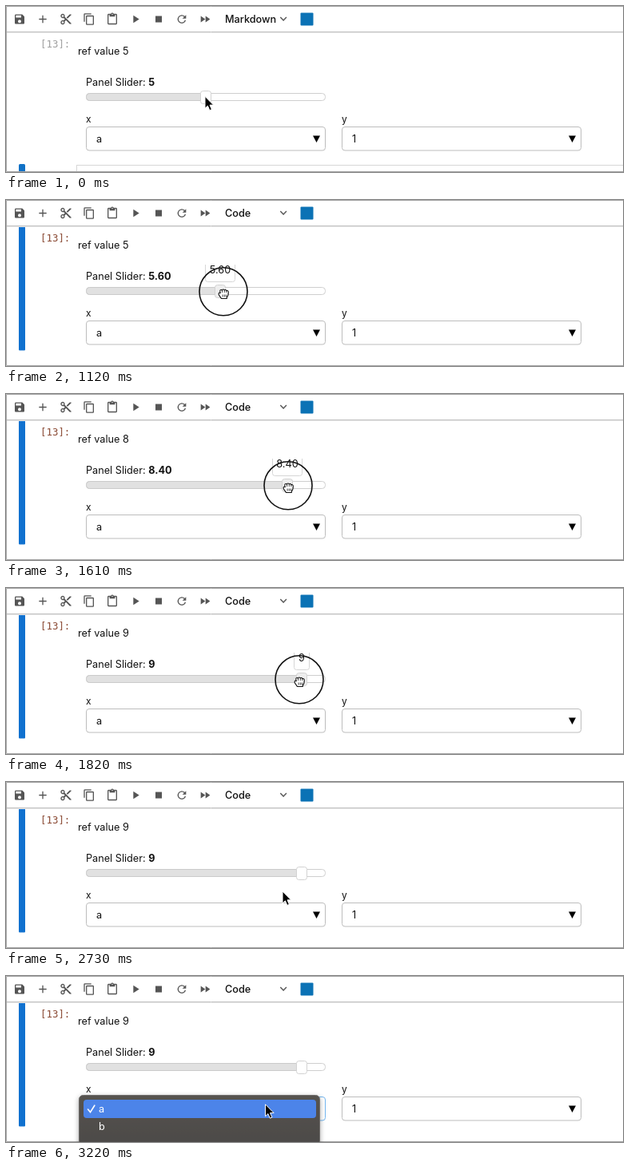
Recreate the animation shown at these times as an HTML page. Size 772x208 px, loop 3290 ms.

```html
<!DOCTYPE html>
<html lang="en">
<head>
<meta charset="utf-8">
<title>Notebook slider</title>
<style>
  html, body { margin: 0; width: 100%; height: 100%; overflow: hidden; background: #fff; }
  svg { display: block; width: 772px; height: 208px; }
  text { font: 12.7px Inter, "Open Sans", sans-serif; fill: #111; white-space: pre; }
  .bold { font-weight: 700; }
  .small { font-size: 12px; }
  .mono { font: 12.4px "DejaVu Sans Mono", monospace; }
  .mid { text-anchor: middle; }
  .field { fill: #fff; stroke: #bdbdbd; }
  .menu text { fill: #fff; }
</style>
</head>
<body>
<svg viewBox="0 0 772 208">
  <defs>
    <clipPath id="output"><rect x="88" y="81" width="684" height="127"/></clipPath>
    <linearGradient id="menuFill" x2="0" y2="1">
      <stop stop-color="#565350"/><stop offset="1" stop-color="#484644"/>
    </linearGradient>
    <filter id="shadow" x="-10%" y="-30%" width="120%" height="160%">
      <feDropShadow dx="0" dy="2" stdDeviation="3" flood-opacity=".35"/>
    </filter>
  </defs>
  <rect width="772" height="208" fill="#fff"/>

  <g id="nextCell">
    <rect x="88.5" y="199.5" width="700" height="30" fill="#fff" stroke="#d6d6d6"/>
    <rect x="16" y="198" width="8" height="20" rx="1.5" fill="#1071c6"/>
  </g>
  <rect id="cellBar" x="16" y="33" width="8" height="155.5" rx="1" fill="#1071cf"/>

  <text id="prompt" class="mono" x="43" y="52">[13]:</text>
  <text id="ref" x="90" y="61"></text>
  <text x="100" y="99.5">Panel Slider: <tspan id="value" class="bold"></tspan></text>

  <rect class="field" x="100.5" y="109.5" width="299" height="9" rx="4" style="stroke:#cfcfcf"/>
  <path id="filled" fill="#e1e1e1" stroke="#cbcbcb"/>
  <rect id="handle" y="106.5" width="13" height="16" rx="3" stroke="#d2d2d2"/>
  <g id="tip" clip-path="url(#output)">
    <rect id="tipBox" y="74.5" height="28" rx="3" fill="#fff" stroke="#d6d6d6"/>
    <text id="tipText" class="mid" y="92.3"></text>
  </g>

  <text class="small" x="100" y="146">x</text>
  <text class="small" x="420" y="146">y</text>
  <rect id="selectX" class="field" x="100.5" y="151.5" width="299" height="29.5" rx="3.5"/>
  <rect class="field" x="420.5" y="151.5" width="299" height="29.5" rx="3.5"/>
  <text x="113" y="171">a</text>
  <text x="433" y="171">1</text>
  <path d="M384 162.5h9l-4.5 8.5zM704 162.5h9l-4.5 8.5z" fill="#000"/>

  <path d="M0 32.5H772" stroke="#bdbdbd"/>
  <path d="M0 33.5H772" stroke="#ececec"/>
  <g id="icons" fill="#555"></g>
  <text id="mode" x="274" y="21" style="font-weight:500"></text>
  <path d="M343.3 14l3.8 4 3.8-4" fill="none" stroke="#555" stroke-width="1.4"/>
  <rect x="368.5" y="8.5" width="16" height="16" rx="1" fill="#0b72b5"/>
  <path d="M772 .5H.5V207.5H772" fill="none" stroke="#a5a5a5"/>

  <g id="menu" class="menu">
    <rect x="91.5" y="149.5" width="301" height="90" rx="5" fill="url(#menuFill)" stroke="#6e6c6a" filter="url(#shadow)"/>
    <rect x="97" y="155" width="291" height="23" rx="4" fill="#4c84e9"/>
    <path d="M102.5 167l3 3.6 5.3-8.4" fill="none" stroke="#fff" stroke-width="1.6" stroke-linecap="round"/>
    <text x="116" y="171">a</text>
    <text x="116" y="193">b</text>
    <text x="116" y="215">c</text>
  </g>

  <circle id="ring" fill="none" stroke="#111" stroke-width="1.6"/>
  <g id="arrow">
    <path d="M0 0V15L3.4 11.8 5.8 17.4 8.4 16.3 6 10.8H10.6Z" fill="#000" stroke="#fff"/>
  </g>
  <g id="openHand" fill="#fff" stroke="#111" stroke-width="1.1" stroke-linejoin="round">
    <path d="M-3.5 8.5C-4 5.5-7 3-7.5 1.5-7.7-.3-5.8-.3-4.2 2L-5.8-4.2C-6-6-4-6.3-3.5-4.6L-2.3-1-2.6-6.5C-2.4-8.3-.4-8.3-.2-6.5L.2-1.2 1.4-6.2C2-7.8 3.8-7.3 3.6-5.5L3-.7 5-3.7C6-5 7.6-4 7-2.4 5.6 1 6 4 4.2 6V8.5Z"/>
    <path d="M-1.2 2.5V6M1 2.5V6M3 2.5V6" fill="none" stroke-width=".8"/>
  </g>
  <g id="closedHand" fill="#fff" stroke="#111" stroke-width="1.1" stroke-linejoin="round">
    <path d="M-3 6.5C-3.4 4.5-6 3-6.2 1-6.2-.8-5-1.2-4-.4L-4.6-3C-4.3-4.8-2.4-4.8-1.9-3.6-1.5-5.4.6-5.4 1-3.8 1.6-5 3.2-4.7 3.5-3.2 4.6-4 6-3.2 6-1.6 6 2 5.3 3.6 4 4.8V6.5Z"/>
    <path d="M-1.7-3.5V-1M1-3.6V-1M3.5-3V-1M-1.2 1.5V4.5M1 1.5V4.5M3 1.5V4.5" fill="none" stroke-width=".8"/>
  </g>
</svg>
<script>
const LOOP = 3290, STEP = 70;
const $ = id => document.getElementById(id);
const set = (id, attrs) => {
  for (const key in attrs) $(id).setAttribute(key, attrs[key]);
};
const show = (id, on) => set(id, { visibility: on ? "visible" : "hidden" });
const move = (id, x, y) => set(id, { transform: `translate(${x} ${y})` });
const mix = (a, b, k) => a + (b - a) * k;
const ease = (t, start, end) => {
  const u = Math.min(1, Math.max(0, (t - start) / (end - start)));
  return u * u * (3 - 2 * u);
};

// Toolbar glyphs on a 24-unit grid, one every 29 px
const glyphs = [
  "M17 3H5c-1.1 0-2 .9-2 2v14c0 1.1.9 2 2 2h14c1.1 0 2-.9 2-2V7zm-5 16a3 3 0 1 1 0-6 3 3 0 0 1 0 6zm3-10H5V5h10z",
  "M19 13h-6v6h-2v-6H5v-2h6V5h2v6h6z",
  "M9.6 7.6a4 4 0 1 0-2 2L10 12l-2.400 2.400a4 4 0 1 0 2 2L12 14l7 7h3v-1zM6 8a2 2 0 1 1 0-4 2 2 0 0 1 0 4zm0 12a2 2 0 1 1 0-4 2 2 0 0 1 0 4zM19 3l-6 6 2 2 7-7V3z",
  "M16 1H4a2 2 0 0 0-2 2v14h2V3h12zm3 4H8a2 2 0 0 0-2 2v14a2 2 0 0 0 2 2h11a2 2 0 0 0 2-2V7a2 2 0 0 0-2-2zm0 16H8V7h11z",
  "M19 2h-4.200a3 3 0 0 0-5.600 0H5a2 2 0 0 0-2 2v16a2 2 0 0 0 2 2h14a2 2 0 0 0 2-2V4a2 2 0 0 0-2-2zm-7 0a1 1 0 1 1 0 2 1 1 0 0 1 0-2zm7 18H5V4h2v3h10V4h2z",
  "M8 5v14l11-7z",
  "M6 6h12v12H6z",
  "M17.650 6.350A8 8 0 1 0 19.730 14h-2.080A6 6 0 1 1 12 6c1.660 0 3.140.69 4.220 1.780L13 11h7V4z",
  "M4 18l8.500-6L4 6zm9-12v12l8.500-6z"
];
$("icons").innerHTML = glyphs.map((d, i) =>
  `<path transform="translate(${9 + 29 * i} 8.500) scale(.667)" d="${d}"/>`).join("");

function ringRadius(t) {
  if (t < 560) return 0;
  if (t < 630) return 21;
  if (t < 700) return 27;
  if (t < 2170) return 30;
  if (t < 2240) return 27;
  if (t < 2310) return 21;
  return t >= 3080 && t < 3150 ? 21 : 0;
}

function draw(time) {
  const t = Math.floor(time / STEP) * STEP;
  const selected = t >= 630;
  const hovering = selected && t < 2590;
  const dragging = selected && t < 2170;
  const menuOpen = t >= 3150;

  // The handle trails the pointer slightly
  const value = Math.round(mix(50, 90, ease(t - 38, 840, 1820))) / 10;
  const label = Number.isInteger(value) ? String(value) : value.toFixed(2);
  const x = 100 + 30 * value;
  const travel = ease(t, 2450, 3010);
  const px = mix(mix(248.5, 367, ease(t, 840, 1820)), 324, travel);
  const py = mix(114.8, 162.3, travel);

  $("mode").textContent = selected ? "Code" : "Markdown";
  $("ref").textContent = "ref value " + Math.floor(value);
  $("value").textContent = label;
  $("tipText").textContent = label;
  $("prompt").style.fill = selected ? "#8b4b35" : "#a0a0a0";
  show("cellBar", selected);
  show("nextCell", !selected);

  set("filled", { d: `M${x} 109.500H104.500a4 4 0 0 0-4 4v1a4 4 0 0 0 4 4H${x}` });
  set("handle", { x: x - 6.5, fill: hovering ? "#eeeeee" : "#fff" });
  const tipWidth = label.length > 1 ? 37 : 19;
  set("tipBox", { x: x - tipWidth / 2, width: tipWidth });
  set("tipText", { x });
  show("tip", hovering);

  $("selectX").style.stroke = menuOpen ? "#72b5ee" : "#bdbdbd";
  show("menu", menuOpen);

  const r = ringRadius(t);
  set("ring", { cx: px, cy: py, r });
  show("ring", r > 0);
  move("arrow", px + 0.5, py - 1.5);
  move("closedHand", px + 0.3, py + 2.2);
  move("openHand", px - 0.8, py + 0.5);
  show("arrow", !hovering);
  show("closedHand", dragging);
  show("openHand", hovering && !dragging);
}

const start = performance.now();
function tick() {
  draw((performance.now() - start) % LOOP);
  requestAnimationFrame(tick);
}
tick();
</script>
</body>
</html>
```
